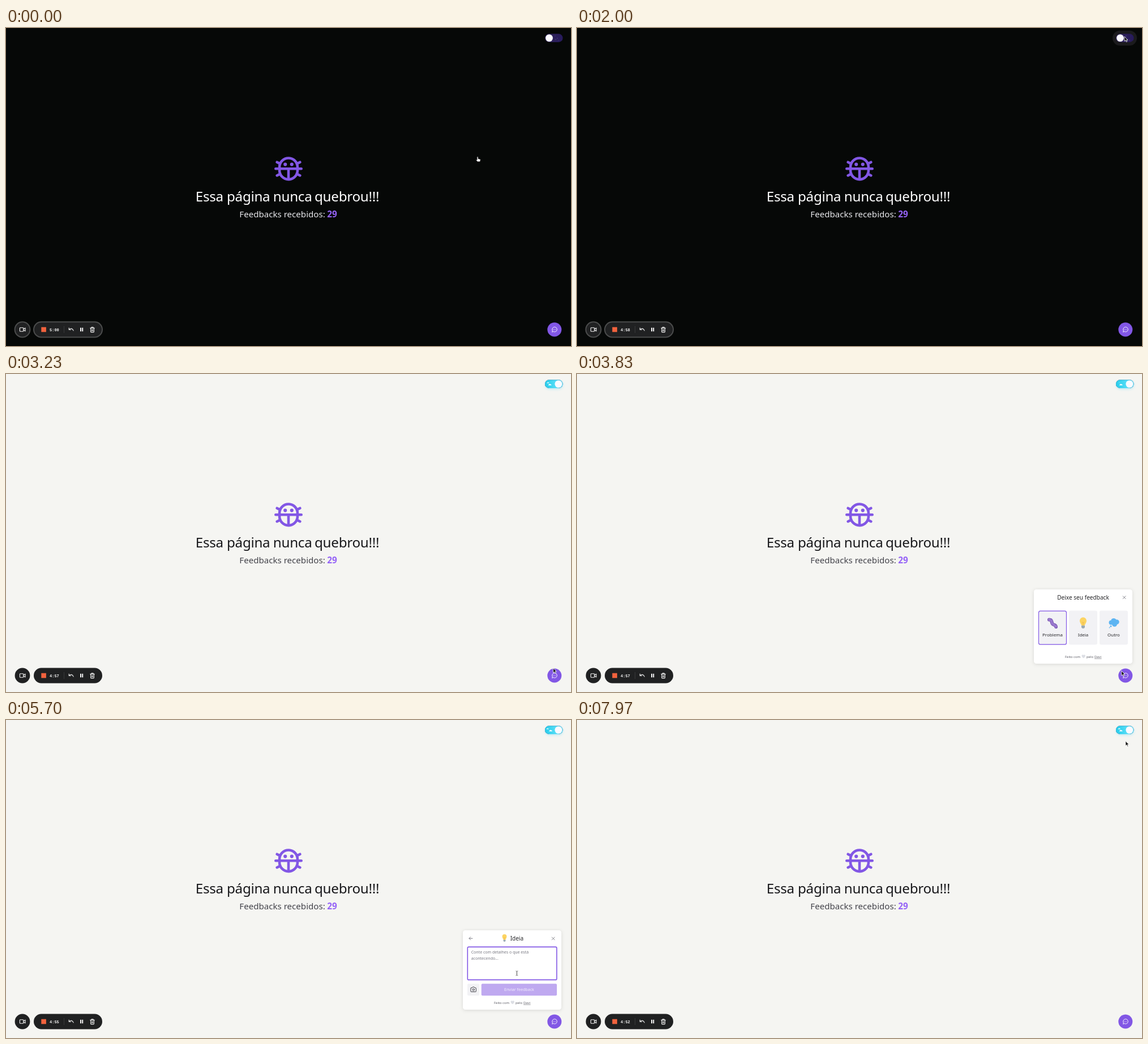
Recreate the animation shown at these times as an HTML page. Size 998 px wide and 561 px high, loop 8000 ms.

```html
<!DOCTYPE html>
<html lang="pt-BR">
<head>
<meta charset="utf-8">
<title>Feedback</title>
<style>
  html, body { margin: 0; width: 100%; height: 100%; overflow: hidden; }
  svg { display: block; width: 100%; height: 100%; font-family: "Noto Sans", sans-serif; }
  #stage { --page: #f5f5f2; --title: #18181b; --sub: #43434a; --ring: none; --edge: none; }
  #stage.dark { --page: #060807; --title: #fff; --sub: #e8e8ec; --ring: #4b4c4c; --edge: #000; }
  .line { fill: none; stroke-linecap: round; stroke-linejoin: round; }
  .brand { fill: #8257e5; }
  .icon { stroke: #f4f4f4; stroke-width: 1.1; }
  .card { fill: #fff; filter: drop-shadow(0 1.5px 3px #0000001f); }
  .tile { fill: #f2f2f5; }
  .focus { fill: none; stroke: #8257e5; stroke-width: 1.2; }
  .center { text-anchor: middle; }
  .dim { stroke: #77777f; stroke-width: .9; }
  .headline { font-size: 24.2px; letter-spacing: -.28px; fill: var(--title); }
</style>
</head>
<body>
<svg id="stage" viewBox="0 0 998 561" preserveAspectRatio="none">
  <defs>
    <linearGradient id="night"><stop stop-color="#2f2456"/><stop offset="1" stop-color="#271a5c"/></linearGradient>
    <linearGradient id="day"><stop stop-color="#27cdec"/><stop offset="1" stop-color="#72e5fb"/></linearGradient>
    <filter id="blur" x="-50%" y="-100%" width="200%" height="300%"><feGaussianBlur stdDeviation="2"/></filter>
    <g id="bulb">
      <path fill="#fcd462" d="M-3 4.5C-3 2-6-.2-6-4a6 6 0 0 1 12 0C6-.2 3 2 3 4.5Z"/>
      <path class="line" stroke="#eeb448" stroke-width=".9" d="M-2-2 0 0 2-2M0 0v4"/>
      <path fill="#9aa9b3" d="M-3 4.5h6v3.2L1.5 9.5h-3L-3 7.7Z"/>
    </g>
    <path id="cross" class="line dim" d="m-2.4-2.4 4.8 4.8m0-4.8-4.8 4.8"/>
    <g id="footer" font-size="5.9" fill="#5d5d66">
      <text x="862" y="500.5">Feito com</text>
      <path fill="#dcdee4" d="M894.7 501.3c-5-3.5-3.1-6.6-1.2-6.1q.8.2 1.2 1 .4-.8 1.2-1c1.9-.5 3.8 2.6-1.2 6.1"/>
      <text x="900" y="500.5">pelo</text>
      <text x="914" y="500.5">Davi</text>
      <path stroke="#5d5d66" stroke-width=".6" d="M914 502.2h12.6"/>
    </g>
  </defs>

  <rect width="998" height="561" fill="var(--page)"/>
  <rect y="560" width="998" height="1" fill="var(--edge)"/>

  <!-- Headline -->
  <g class="line" stroke="#8257e5" stroke-width="4.6">
    <rect x="483.1" y="229.5" width="31.8" height="37.6" rx="15.9"/>
    <path d="M476.3 248.2h45.4M499 248.2v18.5M478.7 236.7l5.3 2.7M519.3 236.7l-5.3 2.7M478.7 260.2l5.3-2.7M519.3 260.2l-5.3-2.7"/>
  </g>
  <g class="brand"><circle cx="493.2" cy="240.6" r="3.1"/><circle cx="504.8" cy="240.6" r="3.1"/></g>
  <text class="headline" y="305.5"><tspan x="334.8">Essa</tspan> <tspan x="390">página</tspan> <tspan x="471.8">nunca</tspan> <tspan x="545">quebrou!!!</tspan></text>
  <text x="412.3" y="334" font-size="15.1" fill="var(--sub)">Feedbacks recebidos:</text>
  <text x="567.3" y="334" font-size="15.3" font-weight="700" fill="#9563f7">29</text>

  <!-- Theme switch -->
  <rect id="halo" x="946" y="4.5" width="43" height="26.5" rx="13.2"/>
  <rect id="glow" x="952.5" y="12.5" width="31" height="14" rx="7" fill="#7adcf5" filter="url(#blur)"/>
  <rect x="952" y="10.3" width="31.5" height="14.7" rx="7.3" fill="url(#night)"/>
  <g id="stars" fill="#c9c0f5"></g>
  <g id="sky">
    <rect x="952" y="10.3" width="31.5" height="14.7" rx="7.3" fill="url(#day)"/>
    <path id="cloudA" fill="#fff" d="M-2.6 1.3a1.1 1.1 0 0 1 1-1.6 1.6 1.6 0 0 1 3 0 1 1 0 0 1 1.1 1.6Z"/>
    <path id="cloudB" fill="#fff" d="M-1.9 1a.8.8 0 0 1 .8-1.2 1.2 1.2 0 0 1 2.2 0A.8.8 0 0 1 1.9 1Z"/>
  </g>
  <circle id="knob" cy="17.6" r="6.4" fill="#fbfaff"/>

  <!-- Recorder -->
  <g fill="#202122" stroke="var(--ring)" stroke-width="2">
    <circle cx="29" cy="532" r="13.4"/>
    <rect x="49" y="518.6" width="121" height="26.8" rx="13.4"/>
  </g>
  <rect x="62.3" y="527.7" width="8.6" height="8.6" fill="#f1623d"/>
  <text id="timer" x="77" y="534.5" font-size="7" font-weight="700" fill="#f0f0f0" font-family="Liberation Mono, monospace"></text>
  <path stroke="#38393a" d="M102.5 526v12"/>
  <g class="line icon">
    <rect x="24.4" y="528.8" width="6.4" height="6.4" rx=".8"/>
    <path d="m31 531 3-1.8v5.6l-3-1.8M111.2 529v3.3h3.3M111.5 532c2.6-2.8 6-2.2 7.6 1.9"/>
    <path d="M132 528.8v6.4M135.2 528.8v6.4" stroke-width="2" stroke-linecap="butt"/>
    <path d="M148.8 529.4h7.4M151 529.2v-1.5h3v1.5M149.6 529.6v6.2q0 .8.8.8h4.2q.8 0 .8-.8v-6.2M151.6 531.7v2.8M153.4 531.7v2.8"/>
  </g>

  <!-- Chat button -->
  <circle class="brand" cx="968.8" cy="532" r="12.5"/>
  <path class="line" stroke="#fff" stroke-width=".9" d="M964.8 536.1l.5-2.1a4.3 4.3 0 1 1 1.6 1.6Z"/>
  <path class="line" stroke="#fff" stroke-width="1.1" d="M967 532h0M969 532h0M971 532h0"/>

  <!-- Feedback kind -->
  <g id="kinds">
    <rect class="card" x="807" y="380" width="174" height="131" rx="4.5"/>
    <text class="center" x="894" y="397.8" font-size="10.1" fill="#27272a">Deixe seu feedback</text>
    <use href="#cross" x="966.7" y="394.2"/>
    <g class="tile">
      <rect x="815" y="417.6" width="50" height="60" rx="3"/>
      <rect x="869" y="417.6" width="50" height="60" rx="3"/>
      <rect x="923" y="417.6" width="50" height="60" rx="3"/>
    </g>
    <rect class="focus" x="815.5" y="418.2" width="49" height="59" rx="3"/>
    <rect class="focus" id="hover" x="869.5" y="418.2" width="49" height="59" rx="3"/>
    <path class="line" stroke="#7450ad" stroke-width="6" d="M834 433.5c6-.5 3.5 5 6 7.5s5.5 1 6 5"/>
    <path class="line" stroke="#9a79cf" stroke-width="4.5" stroke-dasharray="1 3.4" d="M834 433.5c6-.5 3.5 5 6 7.5s5.5 1 6 5"/>
    <use href="#bulb" x="894" y="439.3"/>
    <g fill="#5db4f2">
      <circle cx="943.5" cy="438.5" r="4"/><circle cx="948" cy="435.7" r="4.8"/>
      <circle cx="953.5" cy="437.5" r="4.2"/><circle cx="949.5" cy="441.3" r="4.5"/>
      <circle cx="943" cy="445" r="1.6"/><circle cx="940.6" cy="447.4" r=".9"/>
    </g>
    <g class="center" font-size="7.9" fill="#27272a">
      <text x="840" y="463">Problema</text><text x="894" y="463">Ideia</text><text x="948" y="463">Outro</text>
    </g>
    <use href="#footer"/>
  </g>

  <!-- Feedback form -->
  <g id="form">
    <rect class="card" x="807" y="371" width="174" height="140" rx="4.5"/>
    <path class="line dim" d="M824 385.3h-6m2.6-2.6-2.6 2.6 2.6 2.6"/>
    <use href="#bulb" transform="translate(880.5 384.7) scale(.66)"/>
    <text x="890.7" y="389" font-size="10" fill="#27272a">Ideia</text>
    <use href="#cross" x="966.7" y="385.5"/>
    <rect x="815.3" y="400.4" width="157.5" height="58" rx="2" fill="#fff" stroke="#8257e5" stroke-width="1.6"/>
    <g font-size="7" fill="#777780">
      <text x="821.7" y="412.3">Conte com detalhes o que está</text>
      <text x="821.7" y="423">acontecendo...</text>
    </g>
    <rect class="tile" x="815" y="465.3" width="21" height="21" rx="2"/>
    <path class="line" stroke="#3f3f46" d="M821.5 472.5h1.8l1-1.5h2.6l1 1.5h1.8q.6 0 .6.7v5.6q0 .7-.7.7h-8q-.7 0-.7-.7v-5.6q0-.7.6-.7"/>
    <circle class="line" stroke="#3f3f46" cx="825.6" cy="475.8" r="1.7"/>
    <rect x="839.7" y="465.3" width="133.3" height="21" rx="2" fill="#bfa9f0"/>
    <text class="center" x="906.4" y="478.4" font-size="7.1" fill="#f3eefd">Enviar feedback</text>
    <use href="#footer"/>
  </g>

  <g id="cursor">
    <path id="arrow" fill="#111" stroke="#fff" stroke-width=".8" d="M0 0v8.3l2-1.7 1.4 3 1.4-.7-1.4-2.8h2.6Z"/>
    <path id="hand" fill="#fff" stroke="#111" stroke-width="1" d="M0 0c1 0 1.1.6 1.1 1.2v2.4l3.2.6c.8.2 1 .8.9 1.5L4.6 9h-4.9L-2.8 6.2c-.5-.8.4-1.3 1-.8l.7.6V1.2C-1.1.5-.9 0 0 0Z"/>
    <path id="beam" class="line" stroke="#555" stroke-width=".8" d="M-1.5-4q1.5 0 1.5 1v6q0 1-1.5 1M1.5-4q-1.5 0-1.5 1v6q0 1 1.5 1"/>
  </g>
</svg>
<script>
const LOOP = 8000, THEME = 2070, OPEN = 3560, PICK = 5500, CLOSE = 7450;
const $ = id => document.getElementById(id);
const clamp = v => Math.min(1, Math.max(0, v));
const smooth = v => (v = clamp(v), v * v * (3 - 2 * v));
const show = (id, on) => { $(id).style.display = on ? "" : "none"; };
const move = (id, x, y) => $(id).setAttribute("transform", `translate(${x} ${y})`);

// Pointer waypoints: time, x, y.
const route = [
  [0, 833, 227], [350, 833, 227], [1720, 967, 15], [2250, 967, 15],
  [2500, 986, 100], [2850, 991, 320], [3230, 966.5, 518.5], [3400, 968, 528],
  [3700, 968, 528], [4470, 870.3, 455], [4850, 891, 450], [5550, 891, 450],
  [6100, 952.7, 432.7], [6800, 952.7, 432.7], [7150, 966, 385], [7500, 966, 385],
  [7780, 983, 200], [7970, 969, 38], [8000, 968.5, 33]
];
// Pointer shape from each time on.
const shapes = [[0, "hand"], [350, "arrow"], [3260, "hand"], [3780, "arrow"], [4250, "hand"],
  [PICK, "arrow"], [5700, "beam"], [6960, "arrow"], [7060, "hand"], [CLOSE, "arrow"]];

const still = (a, b) => a[1] === b[1] && a[2] === b[2];

function slope(i, axis) {
  const before = route[i - 1], here = route[i], after = route[i + 1];
  if (!before || !after || still(before, here) || still(here, after)) return 0;
  return (after[axis] - before[axis]) / (after[0] - before[0]);
}

// Cubic Hermite curve through the waypoints, at rest on the pauses.
function pointerAt(t) {
  const i = route.findLastIndex(p => p[0] <= t);
  const a = route[i], b = route[i + 1], span = b[0] - a[0], u = (t - a[0]) / span;
  return [1, 2].map(axis => a[axis] + (b[axis] - a[axis]) * smooth(u)
    + span * u * (1 - u) * ((1 - u) * slope(i, axis) - u * slope(i + 1, axis)));
}

const stars = [[970, 14], [974, 18], [978, 14.5], [976, 21.5], [971, 20]].map(([cx, cy]) => {
  const star = document.createElementNS("http://www.w3.org/2000/svg", "circle");
  for (const [key, value] of Object.entries({ cx, cy, r: .5 })) star.setAttribute(key, value);
  return $("stars").appendChild(star);
});

function drawSwitch(t) {
  const dark = t < THEME, day = smooth((t - THEME - 30) / 400);
  const hover = smooth((t - 1740) / 150) * (1 - smooth((t - 2230) / 250));
  $("halo").setAttribute("fill", dark ? "#1b1b1d" : "#d5d5d7");
  $("halo").setAttribute("filter", dark ? "" : "url(#blur)");
  $("halo").style.opacity = hover;
  $("glow").style.opacity = day * .5;
  $("sky").style.opacity = day;
  $("knob").setAttribute("cx", 959.5 + 16.3 * day);
  stars.forEach((star, i) => { star.style.opacity = .3 + .3 * Math.sin(t / 260 + i * 2.1); });
  move("cloudA", 961.4 + .7 * Math.sin(t / 700), 18.8);
  move("cloudB", 957.5 + .8 * Math.sin(t / 520), 15.3);
  $("cloudB").style.opacity = .5 + .5 * Math.cos((t - 7970) / 400);
}

function draw(t) {
  $("stage").classList.toggle("dark", t < THEME);
  drawSwitch(t);
  const left = 300 - Math.floor((t + 50) / 1000);
  $("timer").textContent = `${Math.floor(left / 60)}:${String(left % 60).padStart(2, "0")}`;
  show("kinds", t >= OPEN && t < PICK);
  show("hover", t >= 4560);
  show("form", t >= PICK && t < CLOSE);
  const shape = shapes.findLast(s => s[0] <= t)[1];
  for (const id of ["arrow", "hand", "beam"]) show(id, id === shape);
  move("cursor", ...pointerAt(t));
}

const start = performance.now();
function tick() {
  draw(Math.max(0, performance.now() - start) % LOOP);
  requestAnimationFrame(tick);
}
tick();
</script>
</body>
</html>
```
